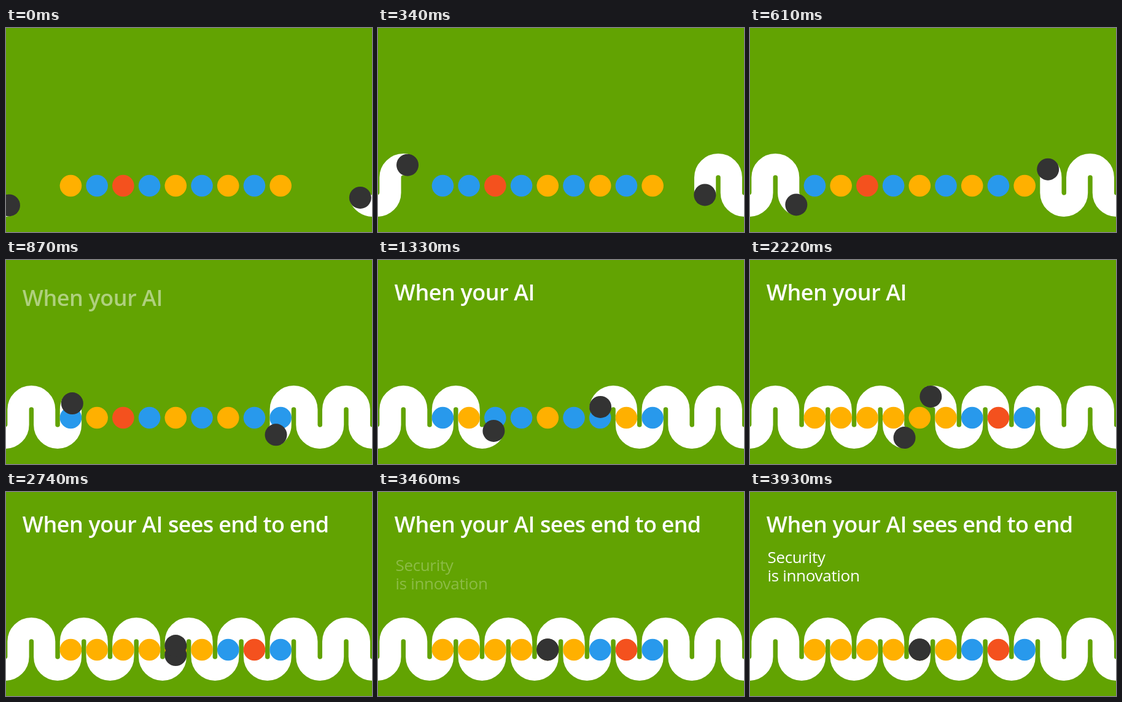
Animation, 596 px wide and 333 px high, one loop 7.06 s. Source, as an HTML page:

```html
<!DOCTYPE html>
<html lang="en">
<head>
<meta charset="utf-8">
<style>
  html, body { margin: 0; width: 100%; height: 100%; overflow: hidden; background: #62a302; }
  svg { display: block; width: 596px; height: 333px; }
  text { fill: #fff; font-family: "Open Sans", "Noto Sans", sans-serif; }
  .title { font-size: 36px; font-weight: 600; letter-spacing: -.45px; }
  .tight { letter-spacing: -.75px; }
  .sub { font-size: 26px; letter-spacing: -.33px; }
  path { fill: none; stroke: #fff; stroke-width: 35.2; }
  .head { fill: #333; }
</style>
</head>
<body>
<svg viewBox="0 0 596 333">
  <g class="line"><text class="title" x="26.8" y="66">When your AI</text></g>
  <g class="line"><text class="title tight" x="264" y="66">sees end to end</text></g>
  <g class="line">
    <text class="sub" x="28.5" y="116">Security</text>
    <text class="sub" x="28.5" y="145.6">is innovation</text>
  </g>
  <g id="tracks"></g>
  <g id="dots"></g>
  <g id="heads"></g>
</svg>
<script>
const LOOP = 7060, STEP = 1000 / 15;
const CENTER = 276.3, PITCH = 42.72, TOP = 244, BOTTOM = 269;
const COLORS = { O: '#ffb000', B: '#2899ec', R: '#f4511e' };

function add(parent, tag, attrs) {
  const node = document.createElementNS('http://www.w3.org/2000/svg', tag);
  for (const name in attrs) node.setAttribute(name, attrs[name]);
  return document.getElementById(parent).appendChild(node);
}

// A track winds from outside the stage to the center column.
function trackPath(turns, dir) {
  let d = `M${CENTER - dir * turns * PITCH} ${BOTTOM}`;
  for (let i = 0; i < turns; i++) {
    const over = i % 2;
    const sweep = +((dir > 0) === !!over);
    d += `a${PITCH / 2} ${PITCH / 2} 0 0 ${sweep} ${dir * PITCH} 0v${(over ? 1 : -1) * (BOTTOM - TOP)}`;
  }
  return d;
}

// Smooth curve through the travelled lengths at the key steps.
const keySteps = [0, 5, 13, 20, 33, 41, 45];
function curve(values) {
  const gap = keySteps.slice(1).map((k, i) => k - keySteps[i]);
  const rate = gap.map((g, i) => (values[i + 1] - values[i]) / g);
  const slope = values.map((_, i) =>
    i === 0 ? rate[0] :
    i === gap.length ? rate[i - 1] :
    (rate[i - 1] * gap[i] + rate[i] * gap[i - 1]) / (gap[i - 1] + gap[i]));
  return step => {
    if (step >= keySteps[gap.length]) return values[gap.length];
    const i = keySteps.findIndex(k => k > step) - 1;
    const u = (step - keySteps[i]) / gap[i], v = 1 - u;
    return v * v * (1 + 2 * u) * values[i] + u * u * (1 + 2 * v) * values[i + 1]
      + u * v * gap[i] * (v * slope[i] - u * slope[i + 1]);
  };
}

const worms = [
  [7, 1, [40, 132.5, 286.6, 425.2, 582.8, 622.7, 631.4]],
  [8, -1, [59, 187.7, 387.1, 523.6, 681.7, 719, 725.1]],
].map(([turns, dir, lengths]) => ({
  track: add('tracks', 'path', { d: trackPath(turns, dir) }),
  head: add('heads', 'circle', { r: 18, class: 'head' }),
  travelled: curve(lengths),
}));

const startColors = 'OBRBOBOBO';
const dots = [...startColors].map((_, i) =>
  add('dots', 'circle', { cx: CENTER + (i - 4) * PITCH, cy: 257.5, r: 17.8 }));
// step, dot, new color
const swaps = [
  [3, 0, 'B'], [8, 1, 'O'], [11, 8, 'B'],
  [16, 2, 'B'], [17, 7, 'O'], [18, 6, 'B'],
  [23, 0, 'O'], [25, 3, 'O'], [27, 2, 'O'], [28, 5, 'O'], [30, 7, 'R'],
];

const lines = [...document.querySelectorAll('.line')];
const lineStarts = [11, 33, 51];

function draw(time) {
  const step = Math.floor((time % LOOP + 10) / STEP);

  for (const { track, head, travelled } of worms) {
    const length = travelled(step), p = track.getPointAtLength(length);
    track.setAttribute('stroke-dasharray', `${length} 2000`);
    head.setAttribute('cx', p.x);
    head.setAttribute('cy', p.y);
  }

  const colors = [...startColors];
  for (const [at, dot, color] of swaps) if (step >= at) colors[dot] = color;
  dots.forEach((dot, i) => dot.setAttribute('fill', COLORS[colors[i]]));

  lines.forEach((line, i) => {
    const x = Math.min(1, Math.max(0, (step - lineStarts[i]) / 7));
    const rest = (1 - x) ** 2;
    line.setAttribute('opacity', 1 - rest);
    line.setAttribute('transform', `translate(0 ${17.6 * rest})`);
  });
}

const begin = performance.now();
(function tick() {
  draw(performance.now() - begin);
  requestAnimationFrame(tick);
})();
</script>
</body>
</html>
```
